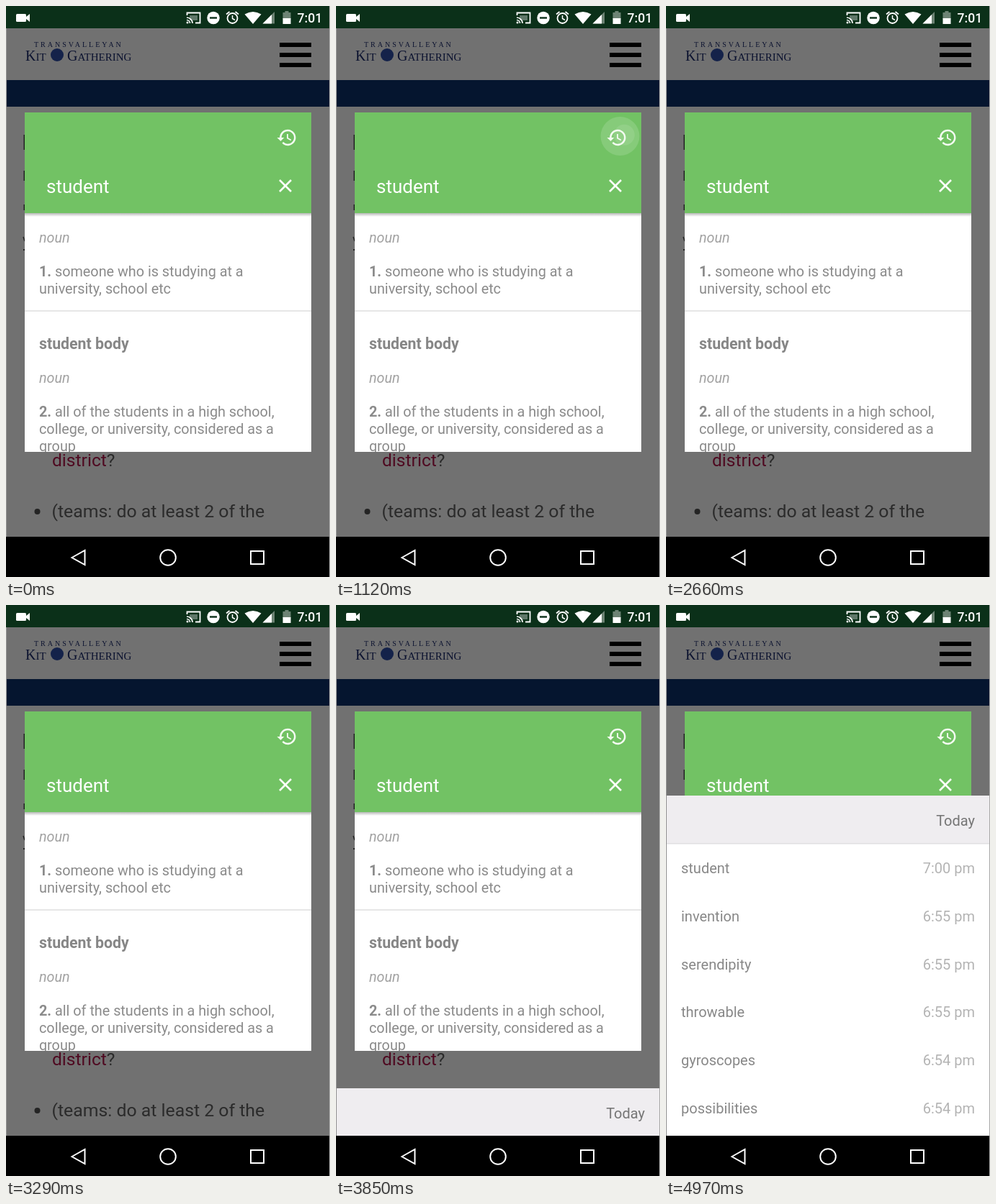
An HTML page with a canvas for the animation above (6.02 s loop, 450 px wide and 794 px high).

```html
<!DOCTYPE html>
<html lang="en">
<head>
<meta charset="utf-8">
<title>Dictionary history</title>
<style>
html, body { margin: 0; width: 100%; height: 100%; overflow: hidden; background: #000; }
canvas { display: block; width: 450px; height: 794px; }
</style>
</head>
<body>
<canvas id="stage" width="450" height="794"></canvas>
<script>
const ctx = document.getElementById('stage').getContext('2d');
const LOOP = 6020, STEP = 70;
const SANS = 'Roboto, sans-serif', SERIF = '"Liberation Serif", serif';
const PAGE = '#717171', GREEN = '#72c264', BODY = '#8b8b8b';

const HISTORY = new Path2D('M13 3a9 9 0 0 0-9 9H1l3.9 3.9.1.1L9 12H6a7 7 0 1 1 2.06 4.94l-1.42 1.42A9 9 0 1 0 13 3zm-1 5v5l4.28 2.54.72-1.21-3.5-2.08V8z');

const ROWS = [
  ['student', '7:00 pm'], ['invention', '6:55 pm'], ['serendipity', '6:55 pm'],
  ['throwable', '6:55 pm'], ['gyroscopes', '6:54 pm'], ['possibilities', '6:54 pm']
];

const clamp = v => Math.max(0, Math.min(1, v));

function rect(x, y, w, h, color) {
  ctx.fillStyle = color;
  ctx.fillRect(x, y, w, h);
}

function disc(x, y, r, color) {
  ctx.fillStyle = color;
  ctx.beginPath();
  ctx.arc(x, y, r, 0, 7);
  ctx.fill();
}

function ring(x, y, r, width, from = 0, to = 2 * Math.PI) {
  ctx.lineWidth = width;
  ctx.beginPath();
  ctx.arc(x, y, r, from, to);
  ctx.stroke();
}

function trace(points, closed) {
  ctx.beginPath();
  points.forEach(([x, y]) => ctx.lineTo(x, y));
  if (closed) ctx.closePath();
}

function poly(points, color) {
  trace(points, true);
  ctx.fillStyle = color;
  ctx.fill();
}

function line(points, width, closed) {
  trace(points, closed);
  ctx.lineWidth = width;
  ctx.stroke();
}

// Draws text and returns its width.
function text(str, x, y, size, color, { style = '', family = SANS, align = 'left', gap = 0 } = {}) {
  ctx.font = `${style} ${size}px ${family}`;
  ctx.letterSpacing = gap + 'px';
  ctx.textAlign = align;
  ctx.fillStyle = color;
  ctx.fillText(str, x, y);
  return ctx.measureText(str).width;
}

function smallCaps(word, x, y) {
  const color = '#0c1330', opts = { family: SERIF };
  const w = text(word[0], x, y, 20, color, opts);
  text(word.slice(1), x + w, y, 15, color, opts);
}

function statusBar() {
  rect(0, 0, 450, 31, '#0b3019');
  ctx.strokeStyle = '#fff';

  // camera
  ctx.fillStyle = '#fff';
  ctx.beginPath();
  ctx.roundRect(14, 11, 14, 11, 1.5);
  ctx.fill();
  poly([[28, 15], [33, 11], [33, 22], [28, 18]], '#fff');

  // cast
  line([[251.5, 13], [251.5, 9.5], [269.5, 9.5], [269.5, 23.5], [263, 23.5]], 1.8);
  ring(251, 24, 4.5, 1.6, -Math.PI / 2, 0);
  ring(251, 24, 8, 1.6, -Math.PI / 2, 0);
  disc(252, 23, 1.5, '#fff');
  rect(255, 13, 11, 7, 'rgba(255,255,255,.35)');

  // do not disturb
  disc(288, 16.5, 8.7, '#fff');
  rect(283, 15.3, 10, 2.4, '#0b3019');

  // alarm
  ring(314.5, 17, 7, 1.8);
  line([[314.5, 13], [314.5, 17.5], [318, 19.5]], 1.5);
  line([[306, 11.5], [310.5, 8]], 1.8);
  line([[323, 11.5], [318.5, 8]], 1.8);

  // wifi
  ctx.fillStyle = '#fff';
  ctx.beginPath();
  ctx.moveTo(343, 25);
  ctx.lineTo(331.5, 11.5);
  ctx.quadraticCurveTo(343, 4.5, 354.5, 11.5);
  ctx.fill();

  // signal
  poly([[356.5, 24.5], [373, 24.5], [373, 8]], '#6d8374');
  poly([[356.5, 24.5], [369, 24.5], [369, 12]], '#fff');

  // battery
  rect(387.5, 7, 5, 2, '#6d8374');
  rect(384.5, 9, 11, 9, '#6d8374');
  rect(384.5, 17, 11, 8, '#fff');

  text('7:01', 404.5, 22.5, 17.6, '#fff', { style: '500' });
}

function page() {
  rect(0, 31, 450, 707, PAGE);
  rect(0, 103, 450, 37, '#05152f');

  text('TRANSVALLEYAN', 39, 57, 10, '#0c1330', { family: SERIF, gap: 3 });
  smallCaps('KIT', 27, 76);
  disc(71, 68, 9, '#14224a');
  smallCaps('GATHERING', 85, 76);

  for (const y of [51, 65, 79]) rect(380, y, 44, 6, '#000');

  // page text showing past the dialog edge
  rect(24.5, 179, 1.5, 21, '#222');
  rect(24.5, 229, 1.5, 14, '#222');
  rect(24.5, 276, 1.5, 8, '#222');
  ctx.strokeStyle = '#222';
  line([[24, 321], [26, 327]], 1.5);
  rect(24, 338, 2, 2, '#222');

  const w = text('district', 64, 640, 24.6, '#4f0a21');
  text('?', 64 + w, 640, 24.6, '#2b2b2b');
  disc(43.5, 703, 4, '#242424');
  text('(teams: do at least 2 of the', 63.5, 711, 24.8, '#2b2b2b');
}

function numbered(n, str, y) {
  const w = text(n + '. ', 46, y, 19.8, BODY, { style: 'bold' });
  text(str, 46 + w, y, 19.8, BODY);
}

function ripple(t) {
  if (t < 980 || t >= 1470) return;
  const grow = clamp((t - 980) / 350);
  const fade = clamp((1470 - t) / 280);
  const white = a => `rgba(255,255,255,${a * fade})`;
  disc(394.5, 181, 27, white(.14 * clamp((t - 910) / 140)));
  disc(404 - 9 * grow, 178 + 3 * grow, 6 + 21 * grow, white(.1));
}

function dialog(t) {
  ctx.save();
  ctx.beginPath();
  ctx.rect(26, 148, 398, 472);
  ctx.clip();
  rect(26, 148, 398, 472, '#fff');
  rect(26, 148, 398, 140, GREEN);

  const shade = ctx.createLinearGradient(0, 288, 0, 293);
  shade.addColorStop(0, 'rgba(0,0,0,.28)');
  shade.addColorStop(1, 'rgba(0,0,0,0)');
  rect(26, 288, 398, 5, shade);

  ripple(t);
  ctx.save();
  ctx.translate(375.2, 168.1);
  ctx.scale(1.24, 1.24);
  ctx.fillStyle = '#f3faf1';
  ctx.fill(HISTORY);
  ctx.restore();

  text('student', 56, 260, 26, '#fff');
  ctx.strokeStyle = '#fff';
  line([[380, 242], [396, 258]], 2.5);
  line([[396, 242], [380, 258]], 2.5);

  const noun = { style: 'italic' };
  text('noun', 46, 328.5, 19.8, '#a2a2a2', noun);
  numbered(1, 'someone who is studying at a', 376);
  text('university, school etc', 46, 399.5, 19.8, BODY);
  rect(26, 423, 398, 2, '#e6e6e6');
  text('student body', 46, 477, 21.3, '#868686', { style: 'bold' });
  text('noun', 46, 524, 19.8, '#a2a2a2', noun);
  numbered(2, 'all of the students in a high school,', 571);
  text('college, or university, considered as a', 46, 595, 19.8, BODY);
  text('group', 46, 618.5, 19.8, BODY);
  ctx.restore();
}

function sheet(top) {
  ctx.save();
  ctx.beginPath();
  ctx.rect(1, top, 448, 738 - top);
  ctx.clip();
  rect(1, top, 448, 473, '#fff');
  rect(1, top, 448, 66, '#efedf0');
  rect(1, top + 66, 448, 1.5, '#e0dfe1');
  text('Today', 429, top + 41.5, 20, '#757575', { align: 'right' });
  ROWS.forEach(([word, time], i) => {
    const y = top + 108 + i * 66.8;
    text(word, 21, y, 20, '#888');
    text(time, 429, y, 20, '#b4b4b4', { align: 'right' });
  });
  ctx.restore();
}

function navBar() {
  rect(0, 738, 450, 56, '#000');
  ctx.strokeStyle = '#fff';
  line([[91.5, 767], [109.5, 757], [109.5, 777]], 2, true);
  ring(225, 767, 10.8, 2);
  ctx.strokeRect(340, 758, 18, 18);
}

function draw(t) {
  statusBar();
  page();
  dialog(t);
  if (t >= 3850) sheet(t < 3920 ? 672 : 265);
  navBar();
  rect(0, 31, 1, 707, '#929292');
  rect(449, 0, 1, 794, '#a8a8a8');
}

const start = performance.now();
function frame() {
  const t = (performance.now() - start) % LOOP;
  draw(Math.floor(t / STEP) * STEP);
  requestAnimationFrame(frame);
}
frame();
</script>
</body>
</html>
```
